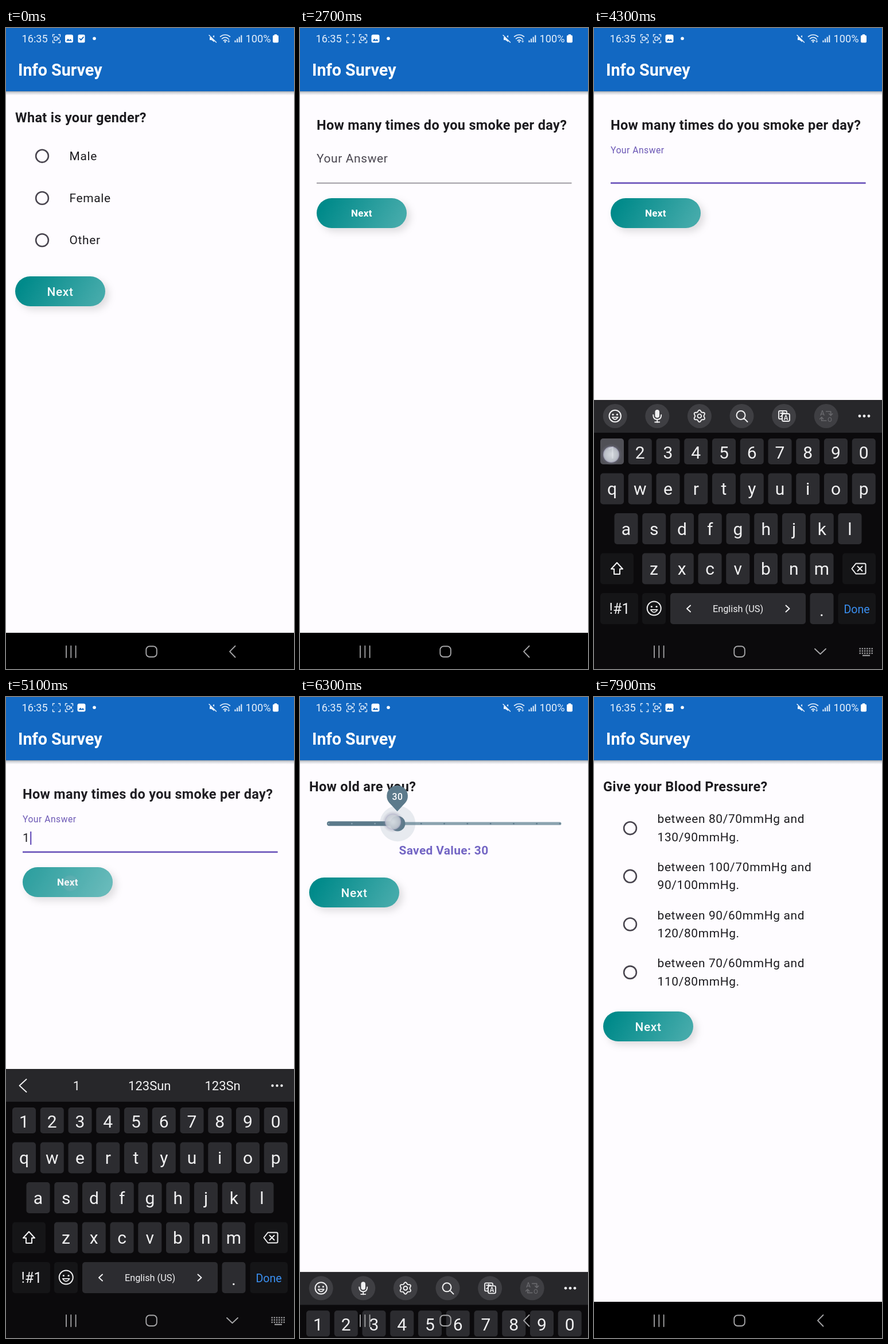
An HTML page with a canvas that plays this animation: 502x1115 px, repeating every 8 s.

```html
<!DOCTYPE html>
<html lang="en">
<head>
<meta charset="utf-8">
<title>Info Survey</title>
<style>
html, body { margin: 0; width: 100%; height: 100%; overflow: hidden; background: #000; }
canvas { display: block; width: 502px; height: 1115px; }
</style>
</head>
<body>
<canvas id="stage"></canvas>
<script>
const W = 502, H = 1115, LOOP = 8000;
const canvas = document.getElementById('stage');
const ctx = canvas.getContext('2d');
const dpr = window.devicePixelRatio || 1;
canvas.width = W * dpr;
canvas.height = H * dpr;

const INK = '#1c1b1f', SOFT = '#49454f', PURPLE = '#7059bd', SLATE = '#5c7a8b';

const clamp = v => Math.min(1, Math.max(0, v));
const ramp = (t, start, dur) => clamp((t - start) / dur);
const ease = (t, start, dur) => { const p = ramp(t, start, dur); return p * p * (3 - 2 * p); };
const mix = (a, b, p) => a + (b - a) * p;

function text(str, x, y, size, { color = INK, weight = 400, gap = 0, align = 'left' } = {}) {
  ctx.font = `${weight} ${size}px Roboto, sans-serif`;
  ctx.letterSpacing = gap + 'px';
  ctx.textAlign = align;
  ctx.fillStyle = color;
  ctx.fillText(str, x, y);
}

function box(x, y, w, h, r, fill) {
  ctx.beginPath();
  ctx.roundRect(x, y, w, h, r);
  if (fill) { ctx.fillStyle = fill; ctx.fill(); }
}

function disc(x, y, r, fill) {
  ctx.beginPath();
  ctx.arc(x, y, r, 0, 7);
  ctx.fillStyle = fill;
  ctx.fill();
}

function stroke(path, color, width, x = 0, y = 0) {
  ctx.save();
  ctx.translate(x, y);
  ctx.strokeStyle = color;
  ctx.lineWidth = width;
  ctx.stroke(new Path2D(path));
  ctx.restore();
}

function fill(path, color, x = 0, y = 0) {
  ctx.save();
  ctx.translate(x, y);
  ctx.fillStyle = color;
  ctx.fill(new Path2D(path));
  ctx.restore();
}

function fade(alpha, draw) {
  if (alpha <= 0) return;
  ctx.save();
  ctx.globalAlpha *= alpha;
  draw();
  ctx.restore();
}

// Survey widgets

const question = (str, x, y) => text(str, x, y, 23.5, { weight: 700, gap: 0.326 });
const option = (str, x, y) => text(str, x, y, 20.9, { gap: 0.65 });

function radio(y) {
  ctx.beginPath();
  ctx.arc(63, y, 10.9, 0, 7);
  ctx.strokeStyle = SOFT;
  ctx.lineWidth = 2.6;
  ctx.stroke();
}

function button(x, y, small, press = 0) {
  const g = ctx.createLinearGradient(x + 22, y - 6, x + 135, y + 58);
  g.addColorStop(0, '#008a8a');
  g.addColorStop(1, '#44aaaa');
  ctx.save();
  ctx.shadowColor = 'rgba(0,0,0,0.13)';
  ctx.shadowBlur = 13 * dpr;
  ctx.shadowOffsetX = ctx.shadowOffsetY = 6 * dpr;
  box(x, y, 157, 52, 26, g);
  ctx.restore();
  fade(press, () => box(x, y, 157, 52, 26, 'rgba(255,255,255,0.18)'));
  if (small) text('Next', x + 78.3, y + 32, 17, { color: '#fff', weight: 700, gap: 0.3, align: 'center' });
  else text('Next', x + 78.5, y + 33.8, 20.9, { color: '#f4fbfb', weight: 500, gap: 0.65, align: 'center' });
}

const pulse = (t, start, dur) => t < start || t > start + dur ? 0 : Math.sin(Math.PI * (t - start) / dur);

function genderPage(t) {
  question('What is your gender?', 16, 164);
  ['Male', 'Female', 'Other'].forEach((s, i) => {
    radio(222.7 + 73.2 * i);
    option(s, 110.5, 229.5 + 73.2 * i);
  });
  button(16, 432, false, pulse(t, 120, 500));
}

function smokingPage(t) {
  question('Do you have a smoking habit?', 36, 170.5);
  const p = ramp(t, 1080, 350);
  if (p > 0 && p < 1) {
    ctx.save();
    box(36, 193, 430, 73, 0);
    ctx.clip();
    disc(150, 229, 40 + 300 * p, `rgba(0,0,0,${0.07 * (1 - p)})`);
    ctx.restore();
  }
  option('Yes', 57, 236.5);
  option('No', 57, 309.7);
  button(36, 365, false, pulse(t, 1780, 500));
}

function countPage(t) {
  question('How many times do you smoke per day?', 29, 177);
  const p = ease(t, 3120, 200);
  text('Your Answer', 29, mix(234, 218.3, p), mix(20.9, 15.7, p),
    { gap: mix(0.65, 0.49, p), color: p > 0.5 ? '#6b57b5' : SOFT });
  ctx.fillStyle = '#7d7982';
  ctx.fillRect(29, 269, 444.5, 1.4);
  fade(p, () => {
    ctx.fillStyle = PURPLE;
    ctx.fillRect(29, 268.3, 444.5, 2.8);
  });
  const typed = t >= 4400;
  if (typed) option('1', 29, 252);
  if (t > 3300 && (t - 2700) % 1000 < 500) {
    ctx.fillStyle = PURPLE;
    ctx.fillRect(typed ? 42 : 29, 234, 2.4, 23);
  }
  button(29, 296, true, pulse(t, 4820, 500));
}

function agePage(t) {
  question('How old are you?', 16, 164);
  const tx = 170.2, ty = 220.2;
  box(47, ty - 2.6, 408.5, 5.2, 2.6, '#8ba3af');
  box(47, ty - 4, tx - 47, 8, 4, SLATE);
  for (let i = 0; i <= 10; i++) disc(50 + 40.3 * i, ty, 1.3, i < 3 ? '#8ba3af' : SLATE);
  const held = ease(t, 6020, 150) * (1 - ease(t, 6550, 150));
  if (held > 0) disc(tx, ty, 31 * held, 'rgba(92,122,139,0.14)');
  disc(tx, ty, 13.2, SLATE);
  const pin = ease(t, 6050, 150) * (1 - ease(t, 6640, 200));
  if (pin > 0) {
    ctx.save();
    ctx.translate(tx - 0.6, 199 + 20 * (1 - ease(t, 6050, 150)));
    ctx.scale(pin, pin);
    fill('M0 0L-14 -15A18.3 18.3 0 1 1 14 -15Z', SLATE);
    text('30', 0.3, -20.5, 15.7, { color: '#fff', weight: 500, gap: 0.5, align: 'center' });
    ctx.restore();
  }
  text('Saved Value: ' + (t < 6080 ? 25 : 30), 172.5, 274, 20.9,
    { weight: 700, gap: 0.36, color: '#7365c4' });
  button(16, 314, false, pulse(t, 7220, 500));
}

function pressurePage() {
  question('Give your Blood Pressure?', 16, 164);
  ['80/70 130/90', '100/70 90/100', '90/60 120/80', '70/60 110/80'].forEach((s, i) => {
    const [low, high] = s.split(' '), y = 83.6 * i;
    radio(228.2 + y);
    option(`between ${low}mmHg and`, 110.5, 219.3 + y);
    option(`${high}mmHg.`, 110.5, 250.7 + y);
  });
  button(16, 547);
}

const PAGES = [
  [genderPage, -500], [smokingPage, 350], [countPage, 2050],
  [agePage, 5080], [pressurePage, 7430]
];

function pages(t) {
  PAGES.forEach(([draw, start], i) => {
    const next = PAGES[i + 1];
    const out = next ? ease(t, next[1], 250) : 0;
    fade(ease(t, start + (i ? 100 : 0), 300) * (1 - out), () => draw(t));
  });
}

// System bars

function recorder(x, inner) {
  const c = '#e6f0fb';
  stroke('M-3.5 -7H-6.5V-3.5M3.5 -7H6.5V-3.5M-3.5 7H-6.5V3.5M3.5 7H6.5V3.5', c, 1.3, x, 18.5);
  fade(inner, () => {
    ctx.strokeStyle = c;
    ctx.lineWidth = 1.4;
    box(x - 4, 15.5, 5.6, 6, 1.5);
    ctx.stroke();
    fill('M2.5 -.5L5 -2.5V2.5L2.5 .5Z', c, x, 18.5);
  });
}

function picture(x) {
  box(x - 7, 11.5, 14, 14, 3, '#fff');
  fill('M-5 4L-2 0L.5 2.5L2.5 .5L5 4Z', '#1268c2', x, 18.5);
}

function checkBox(x) {
  box(x - 6, 11.5, 12, 14, 2, '#fff');
  stroke('M-3 0L-.8 2.4L3.4 -2.6', '#1268c2', 1.8, x, 18.5);
}

function topBar(t) {
  const shade = ctx.createLinearGradient(0, 109, 0, 117);
  shade.addColorStop(0, 'rgba(20,40,60,0.55)');
  shade.addColorStop(0.4, 'rgba(20,40,60,0.2)');
  shade.addColorStop(1, 'rgba(20,40,60,0)');
  ctx.fillStyle = shade;
  ctx.fillRect(0, 109, W, 8);
  ctx.fillStyle = '#1268c2';
  ctx.fillRect(0, 0, W, 110);
  text('Info Survey', 21, 83, 28.7, { color: '#fff', weight: 700 });

  const c = '#e6f0fb';
  text('16:35', 27.5, 25, 18.2, { color: c });
  if (t < 250) {
    recorder(88, 1);
    picture(110);
    checkBox(131.5);
  } else {
    const s = t % 1000;
    recorder(88, ramp(s, 80, 200) * (1 - ramp(s, 610, 80)));
    recorder(110, 1);
    picture(131.5);
  }
  disc(154, 18.3, 2.8, '#fff');

  fill('M-5 -2.5H-2L3 -6V6L-2 2.5H-5Z', c, 360, 18.5);
  stroke('M-6 -6L6 6', '#1268c2', 3.4, 361, 17.5);
  stroke('M-6 -6L6.5 6.5', c, 1.5, 360, 18.5);
  stroke('M-8.5 -3.5Q0 -10 8.5 -3.5M-5.5 .2Q0 -4.3 5.5 .2M-2.8 3.5Q0 1.3 2.8 3.5', c, 1.6, 382, 18.5);
  disc(382, 24, 1.5, c);
  stroke('M6.2 1V6M4.7 4.5L6.2 6.3L7.7 4.5', c, 1, 382, 18.5);
  for (let i = 0; i < 4; i++) {
    ctx.fillStyle = c;
    ctx.fillRect(398.5 + 3.6 * i, 21.5 - 3 * i, 2, 3.5 + 3 * i);
  }
  text('100%', 417.5, 25, 18.2, { color: c });
  box(465, 12.5, 10, 13, 2, '#fff');
  ctx.fillRect(468, 11, 4, 2);
}

function navIcons(up) {
  const c = '#a5a5a7';
  stroke('M105 1075V1095M113.3 1075V1095M121.6 1075V1095', c, 1.8);
  ctx.strokeStyle = c;
  ctx.lineWidth = 1.9;
  box(244.3, 1075.5, 18.5, 18.5, 6);
  ctx.stroke();
  stroke(up ? 'M385 1080L394.5 1089L404 1080' : 'M399.5 1075L390 1084.7L399.5 1094.5', c, 1.9);
  if (!up) return;
  ctx.fillStyle = c;
  for (let r = 0; r < 3; r++)
    for (let i = 0; i < 6; i++) ctx.fillRect(462.5 + 4.2 * i, 1078.5 + 4 * r, 2.4, 2.2);
  ctx.fillRect(468, 1090.5, 13, 2);
}

// Keyboard

const KEY = '#2c2c30', DARK = '#151517', FG = '#f1f1f2';

function smiley(x, y, r) {
  ctx.beginPath();
  ctx.arc(x, y, r, 0, 7);
  ctx.strokeStyle = FG;
  ctx.lineWidth = 2;
  ctx.stroke();
  disc(x - r * 0.36, y - r * 0.25, 1.6, FG);
  disc(x + r * 0.36, y - r * 0.25, 1.6, FG);
  stroke(`M${-r * 0.5} ${r * 0.2}Q0 ${r * 0.95} ${r * 0.5} ${r * 0.2}Z`, FG, 1.7, x, y);
}

function gear(x, y) {
  ctx.beginPath();
  for (let i = 0; i <= 48; i++) {
    const a = i / 48 * Math.PI * 2, r = 8.9 + 1.4 * Math.cos(6 * a);
    ctx.lineTo(x + r * Math.sin(a), y - r * Math.cos(a));
  }
  ctx.strokeStyle = FG;
  ctx.lineWidth = 1.9;
  ctx.stroke();
  ctx.beginPath();
  ctx.arc(x, y, 3.4, 0, 7);
  ctx.stroke();
}

function toolbar() {
  const y = 675;
  for (let i = 0; i < 6; i++) disc(36.7 + 73.6 * i, y, 21, '#3f3f43');
  smiley(36.7, y, 10.2);
  box(106.4, y - 11, 7.6, 14, 3.8, FG);
  stroke('M-7 -2Q-7 6 0 6Q7 6 7 -2M0 6V11M-4 10.5H4', FG, 1.9, 110.2, y);
  gear(183.8, y);
  stroke('M-9 -1.5A7.5 7.5 0 1 1 6 -1.5A7.5 7.5 0 1 1 -9 -1.5M4 4L10 10', FG, 2, 257.5, y);
  stroke('M-3 5H-7Q-9 5 -9 3V-7Q-9 -9 -7 -9H3Q5 -9 5 -7V-5M-6 -5H2M-2 -7V-5Q-3 0 -6 1', FG, 1.8, 331, y);
  box(328, 671, 13, 13, 2.5);
  ctx.strokeStyle = FG;
  ctx.stroke();
  text('A', 334.5, 682, 12, { color: FG, weight: 500, align: 'center' });
  const dim = '#68686c';
  text('A', 398, 674, 12, { color: dim, weight: 500, align: 'center' });
  text('o', 411, 685, 14, { color: dim, align: 'center' });
  stroke('M0 -8H8V-1M5 -4L8 -1L11 -4M0 8H-8V2M-11 5L-8 2L-5 5', dim, 1.7, 404.7, y);
  for (let i = 0; i < 3; i++) disc(463 + 8 * i, y, 2.4, FG);
}

function suggestions() {
  stroke('M35.5 665L23.5 676L35.5 687', FG, 1.9);
  ['1', '123Sun', '123Sn'].forEach((s, i) =>
    text(s, 123 + 127.3 * i, 684, 22, { color: FG, align: 'center' }));
  for (let i = 0; i < 3; i++) disc(464.5 + 8 * i, 676, 2.2, FG);
}

function keyRow(chars, x, y, h, base, lit) {
  [...chars].forEach((c, i) => {
    const kx = x + 48.75 * i;
    box(kx, y, 41, h, 5, c === lit ? '#505056' : KEY);
    text(c, kx + 20.5, base, 30, { color: FG, align: 'center' });
  });
}

function keyboard(t) {
  ctx.fillStyle = '#0b0a0c';
  ctx.fillRect(0, 647, W, 468);
  ctx.fillStyle = '#27272a';
  ctx.fillRect(0, 647, W, 57);
  if (t >= 4500 && t < 6000) suggestions(); else toolbar();

  keyRow('1234567890', 11, 714, 45, 749, t > 4200 && t < 4420 ? '1' : '');
  keyRow('qwertyuiop', 11, 774.5, 54, 812);
  keyRow('asdfghjkl', 35.5, 844, 54, 881.5);
  keyRow('zxcvbnm', 84, 913.5, 54, 951);

  box(11, 913.5, 58, 54, 5, DARK);
  stroke('M0 -11L10 0H5V9H-5V0H-10Z', FG, 2, 40, 941);
  box(433, 913.5, 58, 54, 5, DARK);
  stroke('M-12 0L-5 -9H10Q12 -9 12 -7V7Q12 9 10 9H-5ZM-2 -4L6 4M6 -4L-2 4', FG, 2, 461.5, 940.5);

  box(11, 983, 66, 54, 5, DARK);
  text('!#1', 44.5, 1019, 25, { color: FG, align: 'center' });
  box(84, 983, 41, 54, 5, DARK);
  smiley(104.7, 1009.5, 12);
  box(133, 983, 236, 54, 5, KEY);
  stroke('M168 1004.5L162 1010L168 1015.5M334.5 1004.5L340.5 1010L334.5 1015.5', FG, 2);
  text('English (US)', 251, 1016, 16.3, { color: FG, align: 'center' });
  box(376.5, 983, 41, 54, 5, KEY);
  text('.', 397, 1023, 30, { color: FG, align: 'center' });
  box(425.5, 983, 65.5, 54, 5, DARK);
  text('Done', 458, 1017.5, 19.6, { color: '#3a8ff0', align: 'center' });
}

// Finger marker: start, length, x, y
const TOUCHES = [
  [110, 200, 100, 459], [1080, 220, 150, 230], [1770, 220, 118, 392],
  [3010, 220, 150, 232], [4210, 220, 30, 742], [4810, 220, 112, 324],
  [5990, 450, 162, 217], [7210, 200, 100, 342]
];

function touches(t) {
  for (const [start, len, x, y] of TOUCHES) {
    fade(ramp(t, start, 50) * (1 - ramp(t, start + len, 80)), () => {
      const glow = ctx.createRadialGradient(x, y, 10, x, y, 19);
      glow.addColorStop(0, 'rgba(130,130,155,0.5)');
      glow.addColorStop(1, 'rgba(130,130,155,0)');
      disc(x, y, 19, glow);
      const g = ctx.createRadialGradient(x, y, 2, x, y, 14);
      g.addColorStop(0, 'rgba(225,230,234,0.85)');
      g.addColorStop(0.8, 'rgba(205,211,217,0.8)');
      g.addColorStop(1, 'rgba(180,178,205,0.7)');
      disc(x, y, 14, g);
    });
  }
}

function render(t) {
  ctx.setTransform(dpr, 0, 0, dpr, 0, 0);
  ctx.lineCap = ctx.lineJoin = 'round';
  ctx.fillStyle = '#fefcff';
  ctx.fillRect(0, 0, W, H);
  pages(t);
  topBar(t);
  ctx.fillStyle = '#000';
  ctx.fillRect(0, 1052, W, 63);

  const up = ease(t, 3350, 350) * (1 - ease(t, 6030, 400));
  if (up > 0) {
    // The body reaches the keyboard edge while it slides
    ctx.fillStyle = '#fefcff';
    ctx.fillRect(0, 1052, W, Math.max(0, 647 + 468 * (1 - up) - 1052));
    ctx.save();
    ctx.translate(0, 468 * (1 - up));
    keyboard(t);
    ctx.restore();
  }
  navIcons(up > 0.95);
  touches(t);
}

function tick() {
  render(performance.now() % LOOP);
  requestAnimationFrame(tick);
}
tick();
</script>
</body>
</html>
```
